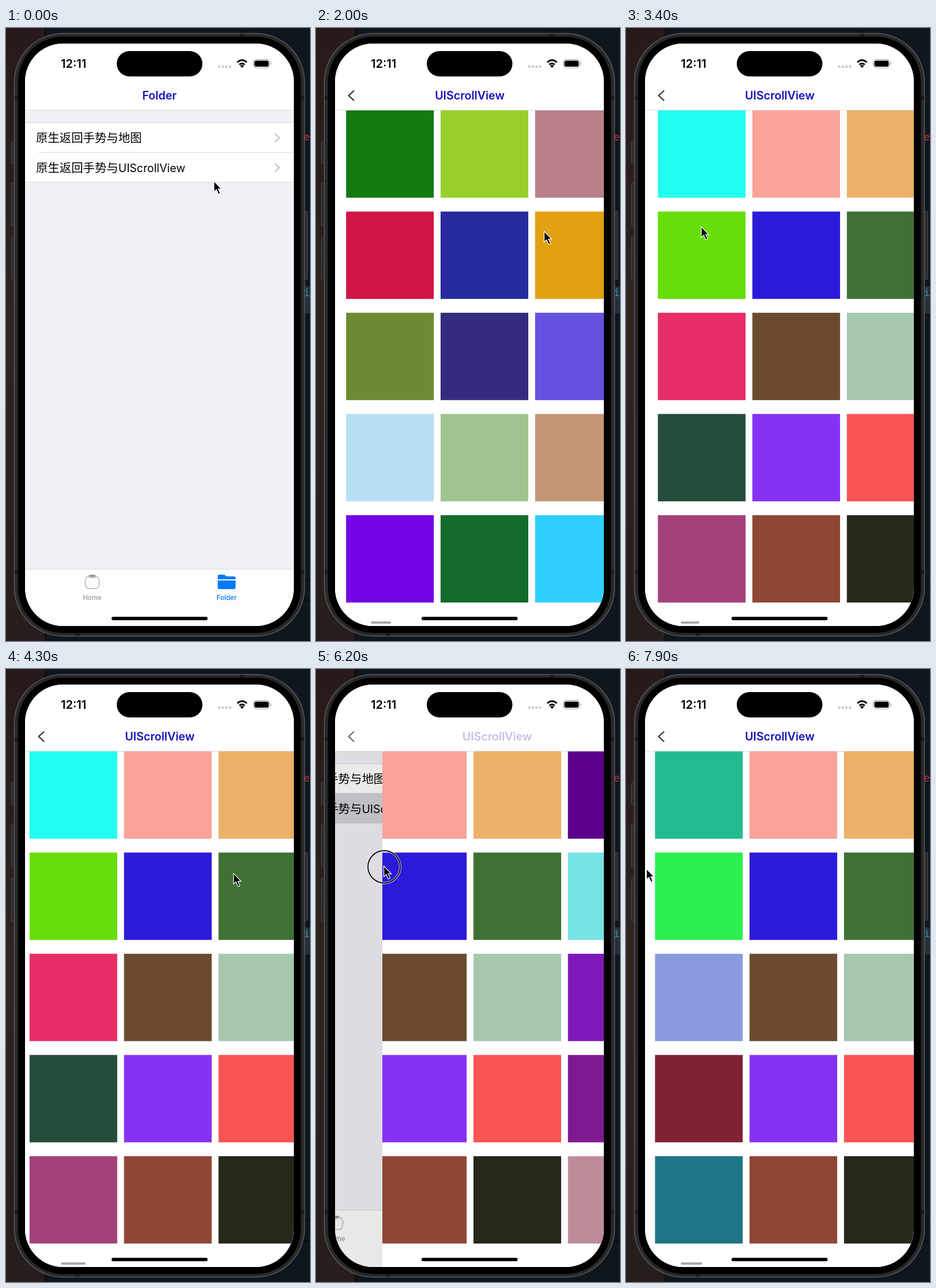
Animation of 527 by 1063 pixels, one loop 8000 ms. Source, as an HTML page:

```html
<!DOCTYPE html>
<html lang="zh-CN">
<head>
<meta charset="utf-8">
<title>Scroll view and back gesture</title>
<style>
html, body { margin: 0; width: 100%; height: 100%; overflow: hidden; background: #10161e; }
svg { display: block; font-family: Inter, "Noto Sans CJK SC", "Noto Sans CJK", sans-serif; }
.title { font-size: 19.6px; font-weight: 600; fill: #1b0fbc; text-anchor: middle; }
.row { font-size: 20.4px; font-family: "Noto Sans CJK SC", "Noto Sans CJK", sans-serif; }
.latin { font-size: 19.4px; font-family: Inter, sans-serif; }
.tab { font-size: 11.6px; font-weight: 500; text-anchor: middle; }
.code { font: 18px "Noto Sans Mono", monospace; }
.line { stroke: #d9d9dc; }
.stroke { fill: none; stroke-linecap: round; stroke-linejoin: round; }
</style>
</head>
<body>
<svg width="527" height="1063" viewBox="0 0 527 1063">
  <defs>
    <clipPath id="screen"><rect x="33" y="27" width="466" height="1010" rx="66"/></clipPath>
    <linearGradient id="wood" x2="0" y2="1">
      <stop stop-color="#271a18"/><stop offset=".5" stop-color="#302421"/><stop offset="1" stop-color="#271d1b"/>
    </linearGradient>
  </defs>

  <rect width="68" height="1063" fill="url(#wood)"/>
  <path d="M68 0V60M68 1000V1063M515 956H527M515 992H527" stroke="#000"/>
  <rect x="515" y="448" width="12" height="47" fill="#26303a"/>
  <text class="code" x="516" y="195" fill="#c8303a">e:</text>
  <text class="code" x="516" y="465" fill="#2e93a8">ig</text>

  <g fill="#2b2b2d" stroke="#4b4b4d">
    <rect x="9.5" y="197" width="8" height="38" rx="2"/>
    <rect x="9.5" y="269" width="8" height="74" rx="2"/>
    <rect x="9.5" y="363" width="8" height="74" rx="2"/>
    <rect x="515" y="318" width="8" height="118" rx="2"/>
  </g>
  <rect x="14.5" y="9.5" width="503" height="1045" rx="84" fill="#29292b" stroke="#5a5a5c" stroke-width="1.5"/>
  <path d="M405 10v5h8v-5M120 1054v-5h8v5M15 118h6v7h-6M15 939h6v7h-6M517 118h-6v7h6M517 939h-6v7h6" fill="#1b1b1d"/>
  <rect x="21" y="15" width="490" height="1034" rx="78" stroke="#111"/>

  <g clip-path="url(#screen)">
    <rect x="33" y="27" width="466" height="1010" fill="#fff"/>
    <g id="list">
      <rect x="33" y="143" width="466" height="795" fill="#f1f0f7"/>
      <rect x="33" y="164" width="466" height="103" fill="#fff"/>
      <rect id="picked" x="33" y="216" width="466" height="51" fill="#d1d1d6"/>
      <path class="line" d="M33 164.5H499M56 215.5H499M33 267.5H499"/>
      <text class="row" x="52" y="198">原生返回手势与地图</text>
      <text class="row" x="52" y="249.5">原生返回手势与<tspan class="latin">UIScrollView</tspan></text>
      <path class="stroke" d="M467 184l7 6.5-7 6.5M467 235.5l7 6.5-7 6.5" stroke="#c2c2c5" stroke-width="2.3"/>
      <rect x="33" y="938" width="466" height="99" fill="#fdfdfd"/>
      <path class="line" d="M33 938.5H499"/>
      <path class="stroke" d="M141 951C134 959 137 972 144 972H155C162 972 165 959 158 951Q150 956 141 951Z" stroke="#c9c9c9" stroke-width="2"/>
      <ellipse cx="149.5" cy="950" rx="6.5" ry="2" fill="#999"/>
      <path d="M367 956V951q0-3 3-3h8q2 0 3 2l1 1h13q3 0 3 3v2ZM367 958H398V970q0 3-3 3H370q-3 0-3-3Z" fill="#007aff"/>
      <text class="tab" x="149.5" y="992" fill="#999">Home</text>
      <text class="tab" x="382.5" y="992" fill="#007aff">Folder</text>
    </g>
    <rect id="dim" x="33" y="143" width="466" height="894"/>
    <g id="page">
      <rect x="33" y="143" width="466" height="894" fill="#fff"/>
      <svg x="33" y="143" width="466" height="894" viewBox="33 143 466 894"><g id="cells"></g></svg>
      <rect id="thumb" y="1029" height="4" rx="2" fill="#a8a8a8"/>
    </g>
    <rect x="33" y="27" width="466" height="116" fill="#fff"/>
    <path class="line" d="M33 142.5H499"/>
    <text id="folder" class="title" y="124">Folder</text>
    <text id="scroller" class="title" y="124">UIScrollView</text>
    <path id="back" class="stroke" d="M65.5 109l-9 8 9 8.5" stroke="#333" stroke-width="2.3"/>

    <text x="95" y="69" font-size="20" font-weight="600">12:11</text>
    <rect x="192" y="40" width="148.5" height="44" rx="22"/>
    <path class="stroke" d="M369.5 67h.1M375.7 67h.1M382 67h.1M388.5 67h.1" stroke="#cbcbcb" stroke-width="4.5"/>
    <path class="stroke" d="M401 59.5Q409 52 417.5 59.5M404.5 63.5Q409 59.5 414 63.5" stroke="#000" stroke-width="2.7" style="stroke-linecap:butt"/>
    <path d="M405.8 65.5Q409.2 63 412.7 65.5L409.2 69Z"/>
    <rect x="428.5" y="54.5" width="29" height="14.5" rx="4.5" fill="none" stroke="#999"/>
    <rect x="430.5" y="56.5" width="25" height="10.5" rx="3"/>
    <path d="M459 59.5q2 2 0 4.5Z" fill="#999"/>
    <rect x="183" y="1021" width="166.5" height="6" rx="3"/>
  </g>

  <g id="pointer">
    <g id="press" fill="none">
      <circle r="28" stroke="#fff" stroke-opacity=".75" stroke-width="4"/>
      <circle r="28" stroke="#111" stroke-width="2"/>
    </g>
    <path d="M-.5-1.5V17L3.7 13.2 7.2 21.3 10.5 19.8 7 12.2H12.5Z" stroke="#fff" stroke-width="1.2"/>
  </g>
</svg>
<script>
const LOOP = 8000, STEP = 100;
const WIDTH = 466, PITCH = 163.8, ROW_PITCH = 175.5, COLUMNS = 9, ROWS = 5;

// The pointer drags from x0 to x1, then travels to where the next gesture begins.
// A swipe leaves the scroll position settling at `rest`.
const gesture = (kind, press, release, x0, x1, y, rest = 0) => ({ kind, press, release, x0, x1, y, rest });
const gestures = [
  gesture("idle", -1, 0, 361, 361, 267),
  gesture("tap", 400, 600, 352, 352, 245),
  gesture("swipe", 1450, 1750, 140, 396, 354),
  gesture("swipe", 2050, 2300, 396, 130, 354, 697),
  gesture("swipe", 2550, 2800, 130, 392, 377),
  gesture("swipe", 3400, 3750, 131, 395, 346),
  gesture("swipe", 4500, 4900, 395, 214, 358, 181),
  gesture("back", 5650, 6656, 36, 180, 343, 181),
  gesture("swipe", 7350, 7450, 180, 204, 343),
  gesture("idle", 7900, LOOP, 36, 36, 348)
];

// Column colours from top to bottom; "/" starts the set used after recycling.
const palette = [
  "137a11 d01544 6e8b33 b9dff5 7404e8/22fff0 67de0a e72e66 264d3c a3417a/22bb91 2aef4d 899bde 802235 207586",
  "97d02b 272b9f 352b7e a0c48f 136b2c/f9a399 2c1ad9 6b4b2f 8532f5 904634",
  "ba808a e2a013 6551e0 c49675 2fd0ff/ecb068 3e7133 a5c7af f95454 25291c",
  "468cdb f8e3ad 32e304 c700ae 9f1c2d/5c008b 76e3e4 7f18b9 7f198f bc8c99",
  "13b5d6 9f3003 318fbe 1492b0 168335",
  "4cc658 cba7fc 7398c3 0ecb00 b5c797"
].map(column => column.split("/").map(set => set.split(" ").map(hex => "#" + hex)));

const $ = id => document.getElementById(id);
const set = (el, attrs) => { for (const k in attrs) el.setAttribute(k, attrs[k]); };
const shift = (id, x, y = 0) => set($(id), { transform: `translate(${x} ${y})` });
const clamp = v => Math.max(0, Math.min(1, v));
const mix = (a, b, k) => a + (b - a) * k;
const ease = k => k * k * (3 - 2 * k);
const spring = ms => Math.exp(-0.0061 * ms) * Math.cos(0.004915 * ms);
const rubber = v => v < 0 ? WIDTH / (1 - v * 0.55 / WIDTH) - WIDTH : v;
const random = seed => Math.abs(Math.sin(seed * 127.1) * 43758.5) % 1;

function pose(t) {
  const n = Math.max(0, gestures.findLastIndex(g => g.press < t));
  const g = gestures[n], next = gestures[n + 1] || g, start = n ? gestures[n - 1].rest : 0;
  const held = t <= g.release;
  const k = held ? (t - g.press) / (g.release - g.press) : (t - g.release) / (next.press - g.release);
  const x = held ? mix(g.x0, g.x1, ease(k)) : mix(g.x1, next.x0, ease(k));
  const y = held ? g.y : mix(g.y, next.y, ease(k));

  const dragged = (held ? x : g.x1) - g.x0;
  const swing = held ? 1 : spring(t - g.release);
  const pulled = g.kind === "swipe" ? rubber(start - dragged) : start;
  const scroll = held ? pulled : mix(g.rest, pulled, swing);
  const pageStart = n < 2 ? WIDTH : g.kind === "back" ? dragged : 0;
  const offset = pageStart * (n ? Math.max(0, swing) : 1);
  return { x, y, scroll, offset, pressed: held && n > 0, scrolling: g.kind === "swipe" || t >= 7900 };
}

const cells = Array.from({ length: COLUMNS * ROWS }, (_, i) => {
  const column = Math.floor(i / ROWS), row = i % ROWS;
  const rect = document.createElementNS($("cells").namespaceURI, "rect");
  set(rect, { x: 44.3 + column * PITCH, y: 142.8 + row * ROW_PITCH, width: 152, height: 151.5 });
  $("cells").append(rect);
  return { rect, column, row };
});

function color(column, row, t) {
  const sets = palette[column];
  if (!sets) return `hsl(${360 * random(column * ROWS + row)} 60% 50%)`;
  const recycled = column < 3 ? (t >= 2500) + (t >= 4900) : +(t >= 3600);
  return sets[Math.min(recycled, sets.length - 1)][row];
}

function draw(t) {
  const { x, y, scroll, offset, pressed, scrolling } = pose(t);
  const shown = 1 - offset / WIDTH;

  shift("list", -140 * shown);
  shift("page", offset);
  set($("dim"), { opacity: 0.1 * shown });
  set($("picked"), { opacity: +(t >= 500) });
  set($("folder"), { x: 266 - 140 * shown, opacity: clamp(1 - 2 * shown) });
  set($("scroller"), { x: 266.5 + 0.58 * offset, opacity: clamp(1 - offset / 110) });
  set($("back"), { opacity: clamp(1 - offset / 300) });

  shift("cells", -scroll);
  for (const { rect, column, row } of cells) set(rect, { fill: color(column, row, t) });
  set($("thumb"), {
    x: 95 + Math.max(0, scroll) / 110,
    width: Math.max(8, 43 + Math.min(0, scroll)),
    opacity: +scrolling
  });

  shift("pointer", x, y);
  set($("press"), { opacity: +pressed });
}

function frame() {
  draw(Math.floor(performance.now() % LOOP / STEP) * STEP);
  requestAnimationFrame(frame);
}
frame();
</script>
</body>
</html>
```
